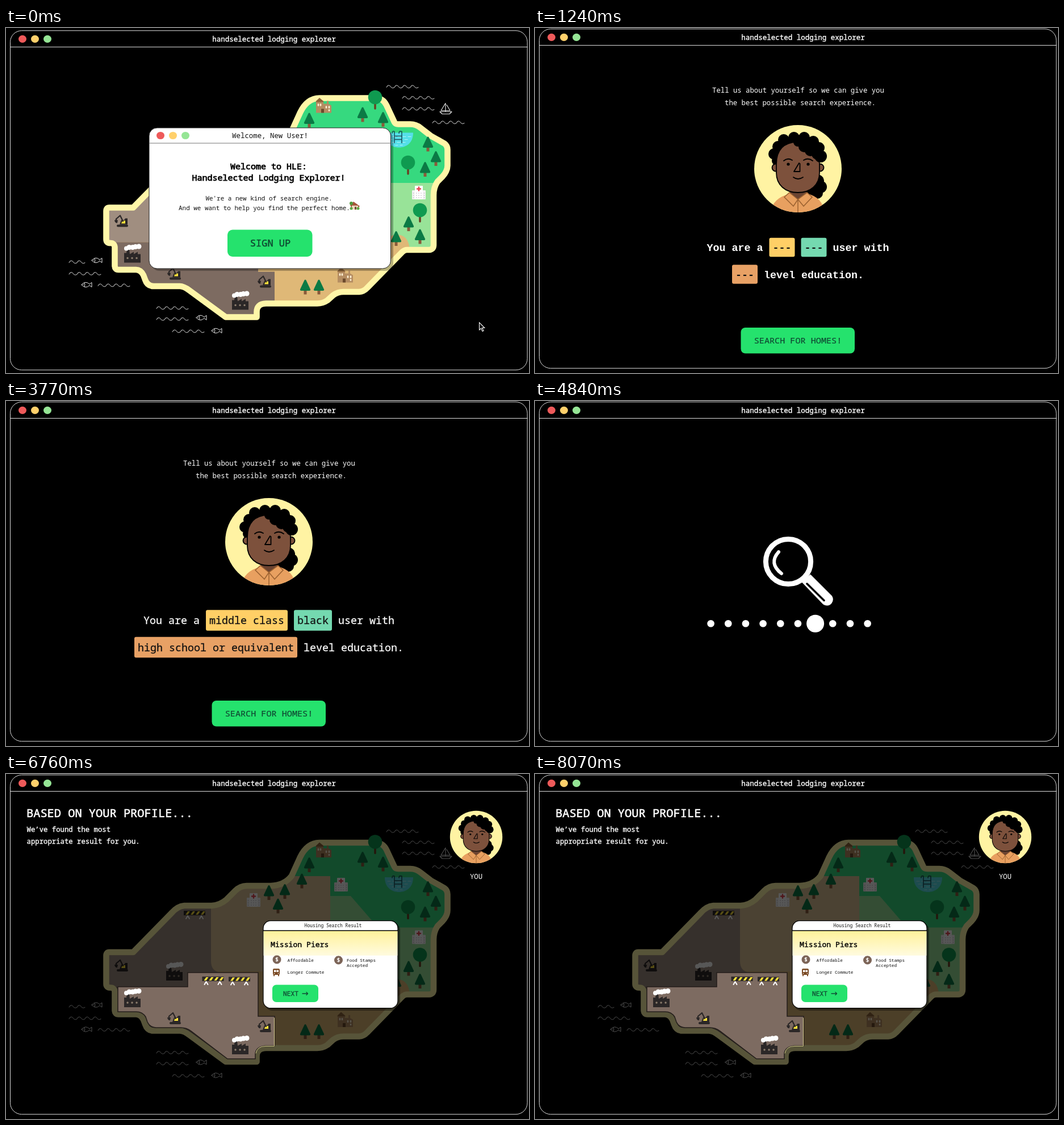
Write an HTML page that moves like this. It is 921 px wide and 608 px high and loops after 8.17 s.

```html
<!DOCTYPE html>
<html lang="en">
<head>
<meta charset="utf-8">
<title>Housing search</title>
<style>
html, body { margin: 0; width: 100%; height: 100%; overflow: hidden; background: #000; }
svg { display: block; width: 921px; height: 608px; }
text { font-family: "Noto Sans Mono", "DejaVu Sans Mono", monospace; white-space: pre; }
.slab { font-family: "Liberation Mono", monospace; font-weight: 700; }
.line { fill: none; stroke-linecap: round; stroke-linejoin: round; }
</style>
</head>
<body>
<svg id="stage" viewBox="0 0 921 608"></svg>
<script>
const LOOP = 8170;
const GREEN = '#25e26d', SAND = '#fff6a8', INK = '#2b2727', INDUSTRY = '#7d6b61';
const MEDIUM = .03, HEAVY = .05; // extra stroke in em, between regular and bold

// ---- helpers
const at = (x, y, s, k = 1) => `<g transform="translate(${x} ${y}) scale(${k})">${s}</g>`;
const path = (d, fill, more = '') => `<path d="${d}" fill="${fill}" ${more}/>`;
const line = (d, color, w = 1) => `<path class="line" d="${d}" stroke="${color}" stroke-width="${w}"/>`;
const rect = (x, y, w, h, fill, r = 0, more = '') =>
  `<rect x="${x}" y="${y}" width="${w}" height="${h}" rx="${r}" fill="${fill}" ${more}/>`;
const dot = (x, y, r, fill, more = '') => `<circle cx="${x}" cy="${y}" r="${r}" fill="${fill}" ${more}/>`;
const text = (x, y, size, s, fill = '#fff', weight = 0, more = '') =>
  `<text x="${x}" y="${y}" font-size="${size}" fill="${fill}" stroke="${fill}" stroke-width="${size * weight}" ${more}>${s}</text>`;
const mid = 'text-anchor="middle"';
const each = (points, draw) => points.map(([x, y, n]) => at(x, y, draw(n))).join('');
const lights = (x, y) => ['#ee5a5a', '#ffd06b', '#95e595']
  .map((c, i) => `<ellipse cx="${x + i * 22}" cy="${y}" rx="7" ry="6.6" fill="${c}"/>`).join('');

// ---- window
const frame = rect(7.5, 1.7, 910.5, 598, '#000', 20, 'stroke="#ddd"') +
  line('M8 30.5H918', '#ddd') + lights(29, 16.3) +
  text(472, 21, 12.5, 'handselected lodging explorer', '#fff', MEDIUM, mid);

// ---- map icons, each centred on 0,0
const pine = () => rect(-2.5, 5, 5, 8, '#8a5a3a') +
  path('M-1.5 -12Q0 -14 1.5 -12L9 4Q9.500 6.500 7 6.500H-7Q-9.500 6.500 -9 4Z', '#0b7a45');
const roundTree = () => line('M0 8V20', '#6b3f22', 3.5) + dot(0, 0, 12.3, '#0f9a50');
const hospital = () => rect(-12, -4, 24, 16, '#f4f4f4', 1) + rect(-7, -12, 14, 24, '#fff', 1) +
  line('M0 -9.500V-3.500M-3 -6.500H3', '#e8414f', 2.4) +
  [-9.5, -4, 0, 4, 9.5].map(x => line(`M${x} 1v.1M${x} 5v.1M${x} 9v.1`, '#b9b4c0', 1.6)).join('');
const school = () => path('M-13 13V-8L-7 -13L0 -8V-3H6V-8H9V-3L14 0V13Z', '#b58d62') +
  path('M-14 -6L-7 -13.500L1 -6Z', '#8d6539') + line('M-9 -2V0M-5 -2V0M5 2V4M10 2V4M10 8V9', '#fff1d6', 2.6) +
  rect(-4, 6, 5, 7, '#6c4a2c');
const pool = () => path('M-25 -13H25C25 5 13 13 0 13S-25 5 -25 -13Z', '#55dfe9') +
  line('M-20 -6h5m4 0h5m4 0h5m4 0h5m4 0h5M-17 -1h5m4 0h5m4 0h5m4 0h5M-12 4h5m4 0h5m4 0h5M-6 9h4m4 0h4', '#b4f3f6', 1.2) +
  line('M-12 -12Q-12 -17 -8 -15V5M0 -12Q0 -17 5 -15V5M-8 -7H5M-8 -1H5', '#174c57', 1.5);
const crane = () => rect(-8, 7, 20, 4, INK, 2) + path('M0 -1H5L7 -4H11V7H-3Z', INK) +
  path('M2 0H7V5H0Z', '#ffe23c') + line('M3 1L-2 -9L-9 -3V0', INK, 2.2) + path('M-12 -1H-6L-7 4Q-11 5 -12 -1Z', INK);
const factory = () => path('M-14 14V-3H-10L-9 -10H-5L-4 -1L3 -5V-1L10 -5V-1H15V14Z', INK) +
  line('M-8 6h.1M0 6h.1M8 6h.1', '#8c7d6d', 3.4) +
  [[-10, -11, 4], [-5, -13, 4.5], [1, -13, 4.5], [6, -14, 4.5], [12, -14.5, 4.5]].map(c => dot(...c, '#fff')).join('');
const barrier = () => line('M-12 2L-15 7M-12 2L-9 7M12 2L9 7M12 2L15 7', '#fff', 2) + rect(-19, -7, 38, 8, INK) +
  [-16, -7, 2, 11].map(x => path(`M${x} 0L${x + 4} -6h4l-4 6Z`, '#ffe23c')).join('');
const wave = n => line('M0 2' + 'q3.500 -6 7 -1.500t7 1.500'.repeat(n), '#a5a5a5', 1.1);
const fish = () => line('M-9 0Q-2 -8 5 -1L9 -4V4L5 1Q-2 8 -9 0ZM-4 -3.500Q-2 0 -4 3.500', '#e8e8e8') + dot(-6, -.5, .8, '#eee');
const boat = () => line('M-10 5H11L7 9H-6ZM0 5V-10L-8 3H8L2 -7', '#eee', 1.1);

// ---- island
const coast = 'M176.5 320Q176.5 314 182 314H224L292 244.5Q302 233 314 232H362Q376 231.5 388 221.5L404 205.5' +
  'Q412 197.5 424 197H466Q490 196.5 503 179.5L518 146.5Q530 121.5 552 121H652Q664 121.5 670 133.5L684 163.5Q686 167.5 692 167' +
  'H712Q722 167 730 173.5L748 187.5L772 201Q777.5 205 777.5 212V240Q777.5 250 768 260L760 268Q753 278 753 292V380' +
  'Q753 388 745 388.5H706Q702 388.5 698 392L636 455.5Q630 462 622 462.5H594Q584 462.5 576 468.5L566 477.5Q558 483 548 483' +
  'H458Q441 483.5 441.5 499V507H387L323 460Q313 452.5 306 452.5H261Q249 453 245 441L242 433Q237 423 228 423.5H198' +
  'Q192 423.5 191.5 417V384Q191 376.5 184 376.5Q176.5 376.5 176.5 370Z';
const yard = 'M197 375H320V350H444V427H473V479H456Q440 481 439 493V502H390L326 453Q318 447 308 447H264' +
  'Q253 446 249 437L246 428Q240 418.5 228 419H197Z';

const land = '<g clip-path="url(#coast)">' +
  rect(170, 110, 620, 410, '#dfb877') +
  path('M571 180H800V400H712Q712 362 690 362Q660 362 650 400H571Z', '#98e398') +
  path('M490 184V100H800V270.500H655L607 215H571V184Z', '#36d97f') +
  path('M361 180H571V348H378Q361 348 361 330Z', '#dcc295') +
  path('M170 225H361V330Q361 348 378 350H320V375H170Z', '#a08e80') +
  path('M190 375H320V350H444V427H473V520H190Z', INDUSTRY) + '</g>' + line(coast, SAND, 10.6);

const yardIcons = each([[364.5, 364], [411, 364.5]], barrier) +
  each([[222, 397], [412, 480]], factory) + each([[296, 430], [455, 444]], crane);

const map = land + each([[670, 100, 4], [698, 119.5, 4], [698, 139, 4], [751, 163, 4], [111, 409, 2], [111, 429.5, 4],
    [162, 450, 4], [265, 490, 4], [265, 509.5, 4], [293, 531, 4]], wave) +
  each([[160, 407], [142, 450], [344, 508], [371, 531]], fish) + at(774, 140, boat()) +
  each([[559, 134], [597, 433]], school) + at(692, 195, pool()) +
  each([[534, 160], [628, 150], [664, 158.5], [521, 188.5], [491, 207], [463, 209], [479, 232.5], [743, 202],
    [757, 227.5], [738, 246.5], [709, 342.5], [729, 365], [687, 368.5], [527, 454], [551, 454]], pine) +
  each([[650, 119.5], [708, 234.5], [729, 318.5]], roundTree) +
  each([[727, 287.5], [590, 195], [436, 222]], hospital) +
  at(203, 337, crane()) + at(296, 350, factory()) + at(332, 248, barrier()) + yardIcons;

// ---- welcome
const cottage = path('M-8 -1L-2 -7L9 1L7 3H-6Z', '#a5553a') + rect(-5, 0, 11, 7, '#ecd9bd') + rect(0, 2, 3, 5, '#75503a') +
  dot(-6, -4, 3, '#4f9a3c') + dot(-6, 5, 2.5, '#5da845') + dot(6, 5, 2.5, '#5da845');
const button = (x, y, w, h, r) => rect(x, y, w, h, GREEN, r);
const welcome = at(0, 3, frame) + at(0, 2.5, map) +
  rect(256, 181, 426, 247, '#000', 14, 'opacity=".28"') +
  rect(252, 176, 425.5, 248, '#fff', 14, 'stroke="#222"') + line('M252.500 203H677', '#777', 1.2) + lights(272, 189.5) +
  text(465, 194, 12.4, 'Welcome, New User!', '#111', 0, mid) +
  text(462.5, 249, 15, 'Welcome to HLE:', '#000', HEAVY, mid) +
  text(462.5, 268.5, 15, 'Handselected Lodging Explorer!', '#000', HEAVY, mid) +
  text(463, 304, 10.95, 'We\'re a new kind of search engine.', '#111', 0, mid) +
  text(455, 321, 10.95, 'And we want to help you find the perfect home.', '#111', 0, mid) +
  at(614, 313, cottage) + button(390, 355.5, 149.5, 47.5, 9) +
  text(465.5, 385, 17, 'SIGN UP', '#0f4d33', MEDIUM, mid) +
  '<g id="cursor">' + path('M0 0V13L3 10.300L5.500 15.500L7.500 14.500L5 9.500H9.200Z', '#000', 'stroke="#fff" stroke-width="1.1"') + '</g>';

// ---- portrait, circle of radius 77 around 0,0
const bumps = list => list.map(c => dot(...c, '#000')).join('');
const portrait = dot(0, 0, 77, '#fff3a3') + '<g clip-path="url(#disc)">' +
  bumps([[-25, -51, 10], [-7, -55, 10], [11, -55, 10], [27, -48, 10], [37, -37, 10], [-35, -39, 10], [-42, -26, 10],
    [-38, -14, 8], [0, -20, 39], [34, 22, 12], [40, 32, 11], [34, 43, 10], [24, 38, 12]]) +
  path('M-47 77Q-46 52 -14 44H16Q44 50 46 77Z', '#e8a060') + path('M-14 34H15V46Q8 54 0 54Q-9 54 -14 46Z', '#6b4331') +
  `<g stroke="#000" stroke-width="1.8">${dot(-39, -2, 6.5, '#7d513c')}${dot(39, -2, 6.5, '#7d513c')}` +
  path('M-38 -8C-38 -33 -25 -47 -1 -47C23 -47 38 -33 38 -8V7C38 29 22 42 0 42S-38 29 -38 7Z', '#7d513c') + '</g>' +
  bumps([[0, -47, 8], [11, -39, 10], [22, -32, 10], [34, -26, 10], [40, -22, 11], [26, -42, 12]]) +
  dot(-17, -8, 2.6, '#000') + dot(18, -8, 2.6, '#000') +
  line('M-25 -14Q-18 -20 -10 -15M10 -15Q18 -20 26 -14M2 -10L-7 5H3.500V-9M-8 15Q0 21 9 15', '#000', 1.8) +
  path('M-15 42L-24 50L-8 66L0 54L10 66L25 50L16 42L0 54Z', '#e8a060', 'stroke="#9c6231" stroke-width="1.6"') +
  line('M0 54V77', '#9c6231', 1.5) + '</g>';

// ---- form: a sentence with coloured blanks, centred on x = 463
const CELL = 11;
function sentence(parts, y, slab) {
  const width = p => p[0].length * CELL + (p[1] ? 12 : 0);
  const total = parts.reduce((sum, p) => sum + width(p) + CELL, -CELL);
  const h = slab ? 33.5 : 36.5, cls = slab ? 'class="slab"' : '';
  let x = 463 - total / 2, out = '';
  for (const p of parts) {
    if (p[1]) out += rect(x, y - 6.5 - h / 2, width(p), h, p[1], 3);
    out += text(x + (p[1] ? 6 : 0), y, CELL / .6, p[0], p[1] ? '#111' : '#fff', slab ? 0 : .015, cls);
    x += width(p) + CELL;
  }
  return out;
}
const form = (income, race, school, slab) => frame +
  text(312, 114, 12.32, 'Tell us about yourself so we can give you') +
  text(334, 135.5, 12.32, 'the best possible search experience.') +
  at(463, 248, portrait) +
  sentence([['You are a'], [income, '#ffcf66'], [race, '#74d9b0'], ['user with']], 393, slab) +
  sentence([[school, '#e8a165'], ['level education.']], 440.5, slab) +
  button(362.5, 528, 200.5, 45.5, 8) + text(463, 555.5, 15.15, 'SEARCH FOR HOMES!', '#114b34', .015, mid);

// ---- loader
const loader = frame + dot(446, 283, 39.6, 'none', 'stroke="#fff" stroke-width="9"') +
  line('M429 266Q411 286 434 304', '#fff', 6) + path('M469.500 319L485 305.500L521 341.500A10 10 0 0 1 507 358Z', '#fff') +
  line('M479 322L509 351.500', '#000', 3.5) +
  Array.from({ length: 10 }, (_, i) => dot(309.6 + i * 30.67, 392.3, 6.3, '#fff', 'class="step"')).join('');

// ---- result
const badge = Array.from({ length: 8 }, (_, i) => rect(-5.6, -5.6, 11.2, 11.2, '#7d6558', 1, `transform="rotate(${i * 11.25})"`)).join('') +
  text(0, 3.2, 9, '$', '#fff', HEAVY, mid);
const bus = rect(-6, -6, 12, 11, '#7a4a24', 2) + rect(-4, -3.5, 3.5, 3.5, '#fff') + rect(.5, -3.5, 3.5, 3.5, '#fff') +
  line('M-3.500 2.500h.1M3.500 2.500h.1', '#fff', 1.6) + line('M-4 5V6.500M4 5V6.500', '#7a4a24', 2);
const result = frame + map + rect(9, 32, 908, 550, '#000', 0, 'opacity=".66"') +
  path(yard, INDUSTRY, 'stroke="#241e1b" stroke-width="1.5"') + line('M440 492Q442 480 457 479.500H472.500V430', SAND, .8) + yardIcons +
  text(36, 76, 20.35, 'BASED ON YOUR PROFILE...', '#fff', MEDIUM) +
  text(36.5, 102, 12.3, 'We’ve found the most', '#fff', MEDIUM) +
  text(36.5, 122.5, 12.3, 'appropriate result for you.', '#fff', MEDIUM) +
  at(828, 111, portrait, .6) + text(828, 185, 12.3, 'YOU', '#fff', 0, mid) +
  rect(456, 262, 238, 155, '#000', 13, 'opacity=".4"') +
  rect(453, 258.7, 237, 154, '#fff', 13, 'stroke="#000" stroke-width="1.200"') +
  rect(453.600, 276, 235.800, 44, 'url(#glow)') + line('M453 276H690', '#000', 1.4) +
  text(576, 270, 8, 'Housing Search Result', '#111', 0, mid) +
  text(466, 305, 13.15, 'Mission Piers', '#000', MEDIUM) +
  at(477, 327, badge) + at(585.5, 328, badge) + at(476, 349, bus) +
  [[495.5, 330.5, 'Affordable'], [495.5, 351.7, 'Longer Commute'], [600, 330.5, 'Food Stamps'], [600, 340, 'Accepted']]
    .map(([x, y, s]) => text(x, y, 7.74, s, '#111')).join('') +
  button(469, 371.5, 81, 30.5, 7) + text(488, 390.7, 11.2, 'NEXT', '#114b34', MEDIUM) +
  line('M522 387H531.500M529 384.500L531.500 387L529 389.500', '#114b34', 1.3);

// ---- timeline
const BLANK = '---';
const scenes = [
  [0, welcome],
  [1240, form(BLANK, BLANK, BLANK, true)],
  [2390, form('middle class', BLANK, BLANK)],
  [2920, form('middle class', 'black', BLANK)],
  [3600, form('middle class', 'black', 'high school or equivalent')],
  [4490, loader],
  [6760, result],
];
const stage = document.getElementById('stage');
stage.innerHTML = `<defs><clipPath id="coast"><path d="${coast}"/></clipPath>
<clipPath id="disc"><circle r="77"/></clipPath>
<linearGradient id="glow" x2="0" y2="1"><stop stop-color="#fff199"/><stop offset="1" stop-color="#fffbdf"/></linearGradient>
</defs>` + scenes.map(s => `<g class="scene" display="none">${s[1]}</g>`).join('');
const groups = stage.querySelectorAll('.scene');
const steps = stage.querySelectorAll('.step');
const cursor = document.getElementById('cursor');

const snap = (t, from, beat) => from + Math.floor((t - from) / beat) * beat;

function render(t) {
  const now = scenes.findLastIndex(s => t >= s[0]);
  groups.forEach((g, i) => g.setAttribute('display', i === now ? 'inline' : 'none'));

  // The pointer travels to the button in six held poses.
  const p = t < 140 ? 0 : Math.min(6, Math.floor((t - 140) / 184) + 1) / 6;
  const e = p * p * (3 - 2 * p);
  cursor.setAttribute('transform', `translate(${833.5 - 362 * e} ${519 - 137 * e})`);

  const beat = t < 5640 ? snap(t, 4490, 168.3) : snap(t, 5640, 161.6);
  const big = Math.floor((beat - 4175) / 100) % 10;
  steps.forEach((d, i) => d.setAttribute('r', i === big ? 15.5 : 6.3));
}

const start = performance.now();
function tick() {
  render((performance.now() - start) % LOOP);
  requestAnimationFrame(tick);
}
tick();
</script>
</body>
</html>
```
